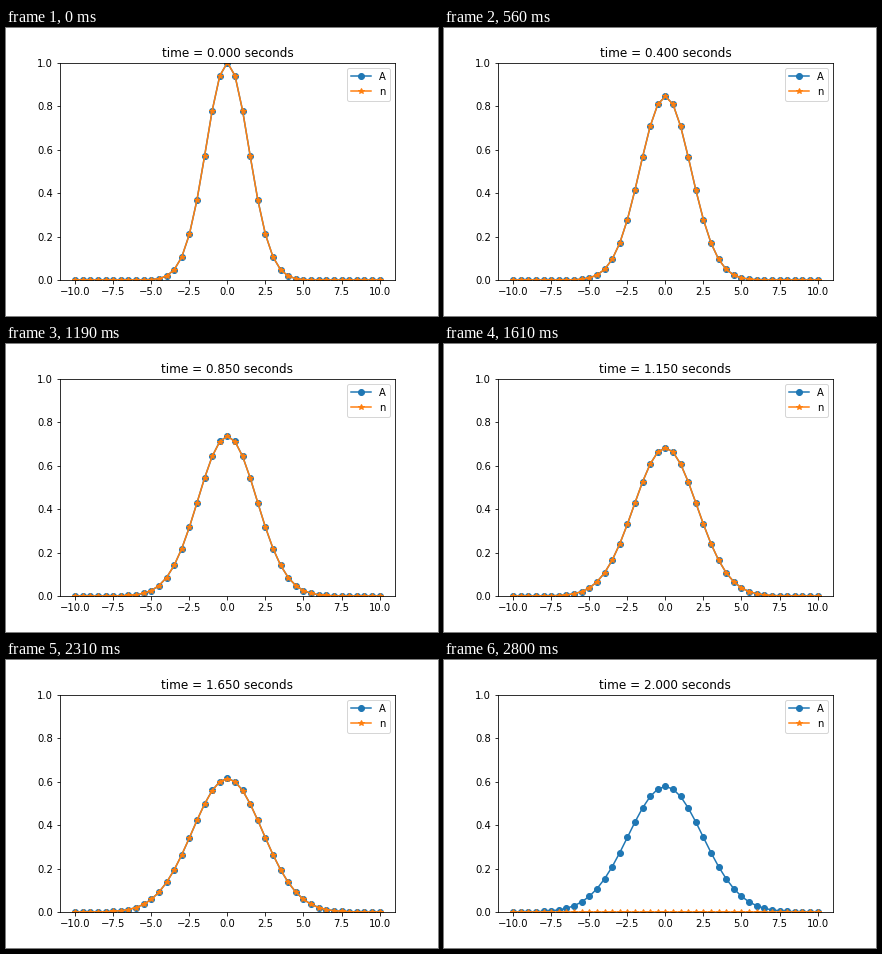
These frames come from a looping animation (432x288 px, 2.87 s). A matplotlib script:

```python
import numpy as np
import matplotlib.pyplot as plt
from matplotlib.animation import FuncAnimation

plt.rcParams["font.family"] = "DejaVu Sans"

DX, DT = 0.5, 0.05
STEPS = 41
INTERVAL = 70

x = np.arange(-10, 10 + DX / 2, DX)


def analytic(t):
    """Spreading Gaussian, the exact solution of u_t = u_xx."""
    return np.exp(-x**2 / (4 * (1 + t))) / np.sqrt(1 + t)


def solve():
    """Explicit finite differences; the last row stays at zero."""
    n = np.zeros((STEPS, x.size))
    n[0] = analytic(0)
    r = DT / DX**2
    for k in range(STEPS - 2):
        n[k + 1, 1:-1] = n[k, 1:-1] + r * (n[k, 2:] - 2 * n[k, 1:-1] + n[k, :-2])
    return n


numeric = solve()

fig, ax = plt.subplots(figsize=(6, 4), dpi=72, facecolor="white")
fig.subplots_adjust(left=0.125, right=0.9, bottom=0.125, top=0.88)
exact_line, = ax.plot(x, analytic(0), "o-", label="A")
numeric_line, = ax.plot(x, numeric[0], "*-", label="n")
ax.set_xlim(-11, 11)
ax.set_ylim(0, 1)
ax.legend(loc="upper right")
title = ax.set_title("time = 0.000 seconds")


def draw(k):
    t = k * DT
    exact_line.set_ydata(analytic(t))
    numeric_line.set_ydata(numeric[k])
    title.set_text(f"time = {t:.3f} seconds")
    return exact_line, numeric_line, title


anim = FuncAnimation(fig, draw, frames=STEPS, interval=INTERVAL,
                     repeat=True, repeat_delay=0, blit=False)
plt.show()
```
